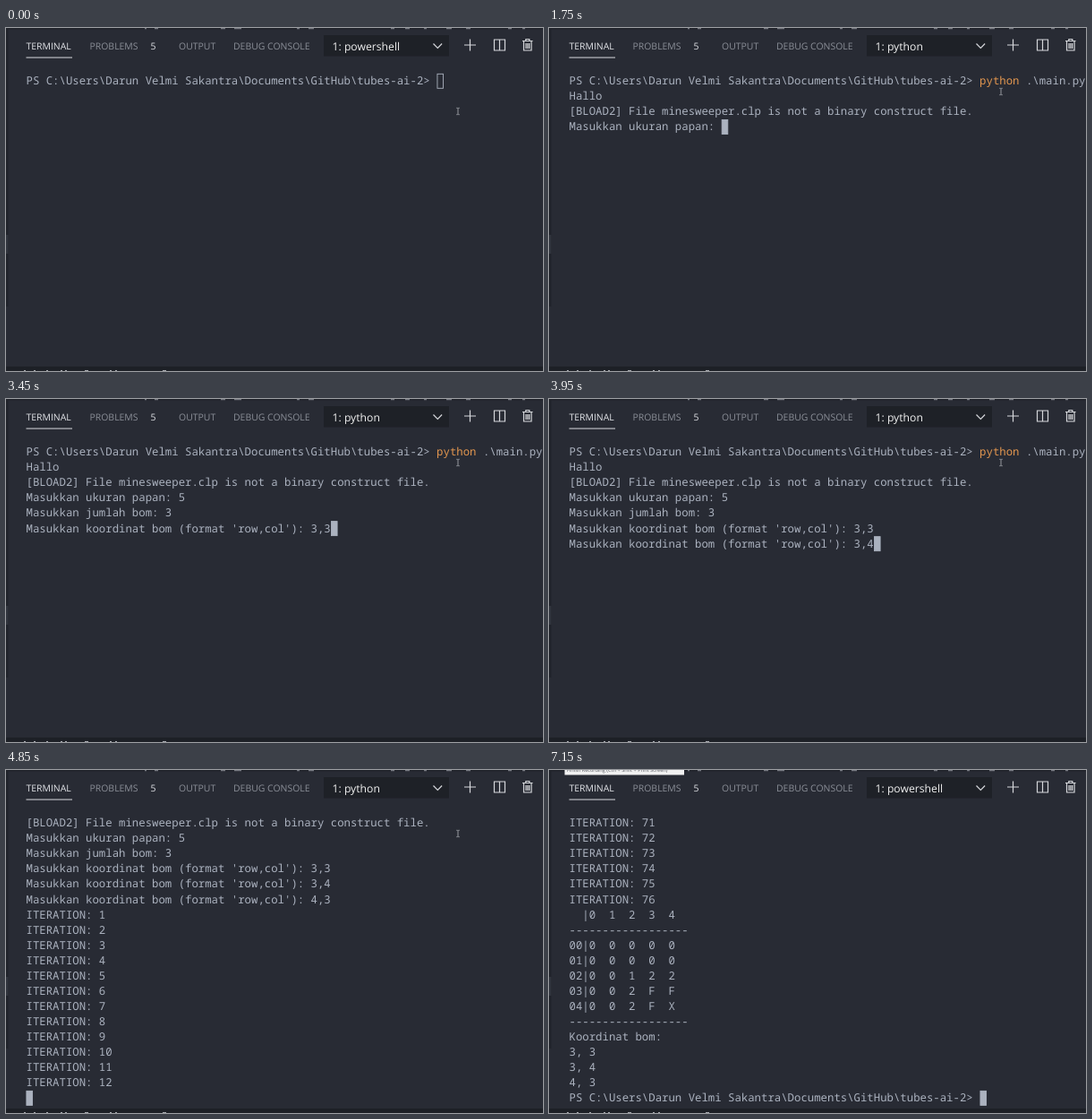
Recreate the animation shown at these times as an HTML page. Size 600 px wide and 383 px high, loop 7250 ms.

```html
<!DOCTYPE html>
<html lang="id">
<head>
<meta charset="utf-8">
<title>Terminal</title>
<style>
  html, body { margin: 0; width: 100%; height: 100%; overflow: hidden; background: #282b34; }
  svg { display: block; width: 600px; height: 383px; }
  text { text-rendering: geometricPrecision; white-space: pre; }
  .tab { font: 10.45px "Open Sans", "Noto Sans", sans-serif; fill: #8b8f98; }
  .tab.on { fill: #e3e5e9; }
  .pick { font: 12.2px "Open Sans", "Noto Sans", sans-serif; fill: #f0f0f0; }
  .tip { font: 5.6px "Open Sans", "Noto Sans", sans-serif; fill: #55585f; }
  #term text { font: 12.34px "Noto Sans Mono", "DejaVu Sans Mono", monospace; fill: #abb2bf; }
  #term .cmd { fill: #e2964f; }
  .icon { fill: none; stroke: #d5d7db; stroke-width: 1.2; }
</style>
</head>
<body>
<svg viewBox="0 0 600 383">
  <rect width="600" height="383" fill="#282b34"/>
  <!-- neighbouring panels -->
  <rect width="600" height="1.5" fill="#20232a"/>
  <path d="M155 .7h2M166 .7h4M240 .7h5M255 .7h8M325 .7h3M338 .7h6M430 .7h4M446 .7h5M467 .7h3M492 .7h6M514 .7h5M561 .7h4M577 .7h3" stroke="#777a82" stroke-width="1.2"/>
  <rect width="2.5" height="311" fill="#20232a"/>
  <rect y="231" width="2.5" height="21" fill="#30343d"/>
  <rect y="378" width="600" height="5" fill="#1d2026"/>
  <path d="M20 382.5h2M31 382.5h2M45 382.5h2M61 382.5h2M66 382.5h2M88 382.5h4M116 382.5h2M122 382.5h2M175 382.5h4" stroke="#a5a8ae"/>

  <text class="tab on" x="22.5" y="23.8">TERMINAL</text>
  <rect x="22.5" y="32.5" width="51.5" height="1" fill="#d9dbe0"/>
  <text class="tab" x="93.5" y="23.8">PROBLEMS</text>
  <text class="tab on" x="161.5" y="23.6">5</text>
  <text class="tab" x="193" y="23.8">OUTPUT</text>
  <text class="tab" x="254" y="23.8">DEBUG CONSOLE</text>
  <rect x="355" y="8" width="140" height="23.5" fill="#1e2127"/>
  <text class="pick" id="pick" x="364.5" y="24.5"></text>

  <g class="icon">
    <path d="M477.5 17.5l4.8 4.8 4.8-4.8"/>
    <path d="M518.5 12.5v13M512 19h13"/>
    <path d="M545.5 13h12v12h-12zM551.5 13v12"/>
    <path d="M577 14.5h11.5M580.8 14.5v-2h4v2M578.5 14.5v10.5h8.5v-10.5M581 17v6M582.8 17v6M584.6 17v6"/>
  </g>

  <g id="term"></g>
  <rect id="caret" width="6.6" height="16" stroke="#abb2bf" stroke-width=".9" fill="#abb2bf"/>
  <path id="mouse" d="M-1.7-3.7h1.2l.5.5.5-.5h1.2M0-3.2v6.4M-1.7 3.7h1.2l.5-.5.5.5h1.2" fill="none" stroke="#a4a7ad" stroke-width=".9"/>
  <g id="tip">
    <rect x="17.5" y="-1" width="133.5" height="6.5" fill="#f1f1f1"/>
    <text class="tip" x="20" y="2.2">Finish Recording (Ctrl + Shift + Print Screen)</text>
  </g>
</svg>
<script>
const LOOP = 7250, TICK = 50, ROWS = 19;
const CELL = 7.404, ROW = 17.06, LEFT = 22.5, TOP = 50.5;
const PROMPT = String.raw`PS C:\Users\Darun Velmi Sakantra\Documents\GitHub\tubes-ai-2> `;
const $ = id => document.getElementById(id);

// Screen states: [start time, whole text, shell title]
const steps = [];
const show = (t, text, title = 'python') => steps.push([t, text, title]);

let log = PROMPT;
show(0, log, 'powershell');
const word = 'python main';
for (let i = 1; i <= word.length; i++) show(950 + TICK * i, log + word.slice(0, i), 'powershell');
log += String.raw`python .\main.py`;
show(1550, log, 'powershell');

log += '\nHallo\n[BLOAD2] File minesweeper.clp is not a binary construct file.';
// Each answer: question, time it appears, then [time, typed so far]...
const COORD = "Masukkan koordinat bom (format 'row,col'): ";
const asks = [
  ['Masukkan ukuran papan: ', 1750, [2350, '5']],
  ['Masukkan jumlah bom: ', 2550, [2800, '3']],
  [COORD, 3150, [3350, '3,'], [3450, '3,3']],
  [COORD, 3550, [3700, '3'], [3750, '3,'], [3950, '3,4']],
  [COORD, 4000, [4650, '4,'], [4700, '4,3']]
];
const enterAt = { 2350: 2500, 2800: 3050, 4700: 4800 };
for (const [question, start, ...keys] of asks) {
  log += '\n' + question;
  show(start, log);
  for (const [t, typed] of keys) show(t, log + typed);
  const [last, answer] = keys[keys.length - 1];
  log += answer;
  if (enterAt[last]) show(enterAt[last], log + '\n');
}

const iterations = n => Array.from({ length: n }, (_, i) => `\nITERATION: ${i + 1}`).join('');
[12, 36, 76].forEach((n, i) => show(4850 + TICK * i, log + iterations(n) + '\n'));

const rule = '-'.repeat(18);
const board = ['00000', '00000', '00122', '002FF', '002FX']
  .map((r, i) => `0${i}|` + [...r].join('  '));
show(5050, log + iterations(76) + '\n' + [
  '  |0  1  2  3  4', rule, ...board, rule,
  'Koordinat bom:', '3, 3', '3, 4', '4, 3', PROMPT
].join('\n'), 'powershell');

// Mouse path: [time, x, y]
const path = [
  [0, 505, 93], [250, 505, 71], [5350, 505, 71], [5600, 377, 180],
  [5700, 377, 180], [5850, 339, 206], [6700, 339, 206], [6800, 197, 41]
];

function mouseAt(t) {
  const i = path.findIndex(p => p[0] > t);
  if (i < 0) return path[path.length - 1].slice(1);
  const [a, b] = [path[i - 1], path[i]];
  const k = (t - a[0]) / (b[0] - a[0]);
  return [1, 2].map(j => a[j] + (b[j] - a[j]) * k);
}

const rows = Array.from({ length: ROWS }, (_, i) => {
  const el = document.createElementNS('http://www.w3.org/2000/svg', 'text');
  el.setAttribute('x', LEFT);
  el.setAttribute('y', TOP + 12.7 + ROW * i);
  return $('term').appendChild(el);
});

function fillRow(el, line) {
  el.textContent = line;
  if (!line.startsWith(PROMPT) || line === PROMPT) return;
  const [cmd] = line.slice(PROMPT.length).split(' ');
  const span = document.createElementNS('http://www.w3.org/2000/svg', 'tspan');
  span.setAttribute('class', 'cmd');
  span.textContent = cmd;
  el.textContent = PROMPT;
  el.append(span, line.slice(PROMPT.length + cmd.length));
}

let current;
function draw(now) {
  const t = Math.floor(now % LOOP / TICK) * TICK;
  const step = steps.filter(s => s[0] <= t).pop();
  if (step !== current) {
    current = step;
    const lines = step[1].split('\n').slice(-ROWS);
    rows.forEach((el, i) => fillRow(el, lines[i] || ''));
    const end = lines.length - 1;
    $('caret').setAttribute('x', LEFT + CELL * lines[end].length + .4);
    $('caret').setAttribute('y', TOP + .8 + ROW * end);
    $('pick').textContent = '1: ' + step[2];
  }
  $('caret').setAttribute('fill-opacity', t < 400 ? 0 : t < 450 ? .5 : 1);
  $('mouse').setAttribute('transform', `translate(${mouseAt(t)})`);
  $('mouse').setAttribute('visibility', t < 6850 ? 'visible' : 'hidden');
  $('tip').setAttribute('opacity', Math.max(0, Math.min(1, (t - 7000) / 150)));
}

const began = performance.now();
function frame() {
  draw(performance.now() - began);
  requestAnimationFrame(frame);
}
frame();
</script>
</body>
</html>
```
